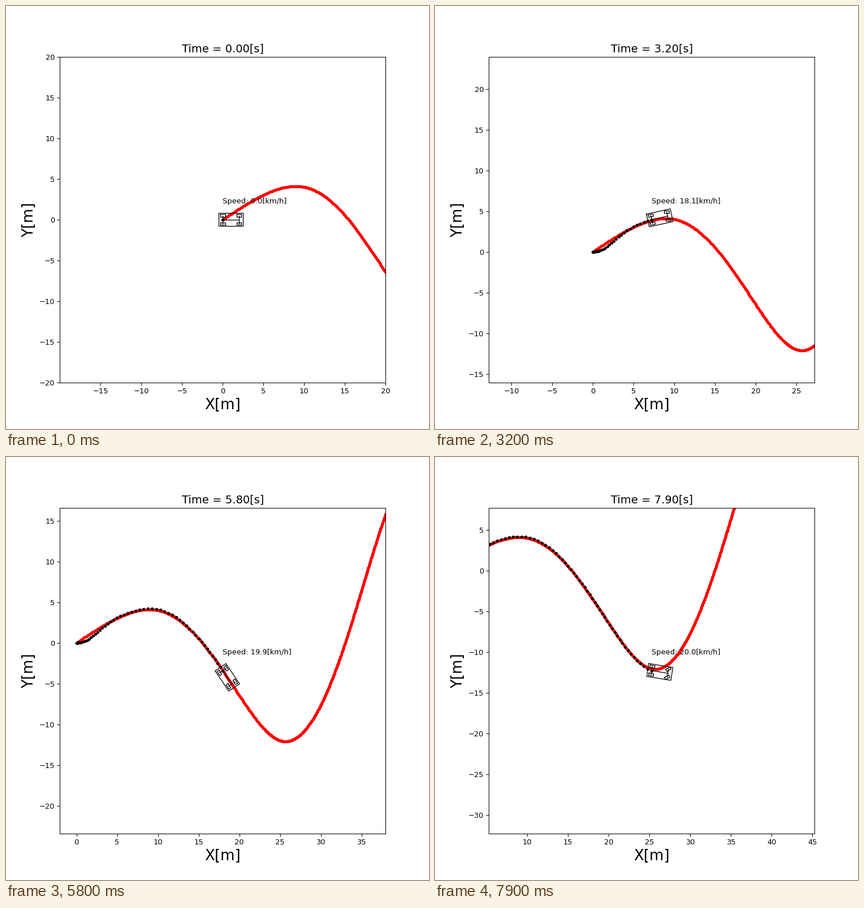
Write a matplotlib script that moves like this. It is 748 px wide and 748 px high and loops after 8000 ms.

```python
import numpy as np
import matplotlib.pyplot as plt
from matplotlib.animation import FuncAnimation

FRAMES, DT = 80, 0.1
BASE = 2.0                      # wheel base [m]
TARGET = 20.0                   # cruising speed [km/h]
MAX_STEER = np.radians(40)
K_YAW, K_SIDE = 1.0, 0.5


def natural_spline(t, p, s):
    """Value, first and second derivative of a natural cubic spline."""
    h, n = np.diff(t), len(t)
    a, b = np.eye(n), np.zeros(n)
    for i in range(1, n - 1):
        a[i, i - 1:i + 2] = h[i - 1], 2 * (h[i - 1] + h[i]), h[i]
        b[i] = 6 * ((p[i + 1] - p[i]) / h[i] - (p[i] - p[i - 1]) / h[i - 1])
    m = np.linalg.solve(a, b)
    i = np.clip(np.searchsorted(t, s, side="right") - 1, 0, n - 2)
    u, k = s - t[i], (m[i + 1] - m[i]) / h[i]
    slope = (p[i + 1] - p[i]) / h[i] - h[i] * (2 * m[i] + m[i + 1]) / 6
    return (p[i] + u * (slope + u * (m[i] / 2 + u * k / 6)),
            slope + u * (m[i] + u * k / 2),
            m[i] + u * k)


# Course through a few way points
way_x = np.array([0.0, 10, 25, 40, 50])
way_y = np.array([0.0, 4, -12, 20, -13])
knots = np.concatenate([[0], np.cumsum(np.hypot(np.diff(way_x), np.diff(way_y)))])
s = np.arange(0, knots[-1], 0.1)
cx, dx, ddx = natural_spline(knots, way_x, s)
cy, dy, ddy = natural_spline(knots, way_y, s)
c_yaw = np.arctan2(dy, dx)
c_curv = (dx * ddy - dy * ddx) / np.hypot(dx, dy) ** 3


def speed_at(k):
    """Soft start up to half speed, then an exponential approach [km/h]."""
    if k <= 16:
        return TARGET / 2 * (k / 16) ** 1.7
    return TARGET * (1 - 0.5 * 0.9 ** (k - 16))


def steering(x, y, yaw):
    """Rear wheel feedback on heading and lateral error."""
    i = np.argmin(np.hypot(cx - x, cy - y))
    side = (y - cy[i]) * np.cos(c_yaw[i]) - (x - cx[i]) * np.sin(c_yaw[i])
    err = (yaw - c_yaw[i] + np.pi) % (2 * np.pi) - np.pi
    curv = (c_curv[i] * np.cos(err) / (1 - c_curv[i] * side)
            - K_YAW * err - K_SIDE * side * np.sinc(err / np.pi))
    return np.clip(np.arctan(BASE * curv), -MAX_STEER, MAX_STEER)


def simulate():
    x, y, yaw = 1e-6, 0.0, 0.0
    states = [(x, y, yaw, 0.0, 0.0)]
    for k in range(1, FRAMES):
        steer = steering(x, y, yaw)
        step = (speed_at(k - 1) + speed_at(k)) / 2 / 3.6 * DT
        x += step * np.cos(yaw)
        y += step * np.sin(yaw)
        yaw += step * np.tan(steer) / BASE
        states.append((x, y, yaw, steer, speed_at(k)))
    return np.array(states)


def box(x0, x1, half):
    return np.array([[x0, x1, x1, x0, x0], [half, half, -half, -half, half]])


def place(pts, angle, x, y):
    c, q = np.cos(angle), np.sin(angle)
    return np.array([[c, -q], [q, c]]) @ pts + [[x], [y]]


BODY, TIRE = box(-0.5, 2.5, 0.8), box(-0.3, 0.3, 0.15)
AXLES = [np.array([[0, 0], [-0.5, 0.5]]),
         np.array([[BASE, BASE], [-0.5, 0.5]]),
         np.array([[0, BASE], [0, 0]])]


def car_parts(steer):
    tires = [place(TIRE, a, px, py)
             for px, a in ((0, 0), (BASE, steer)) for py in (0.5, -0.5)]
    return [BODY] + AXLES + tires


states = simulate()

fig = plt.figure(figsize=(8, 8), dpi=93.5)
ax = fig.add_subplot()
ax.set_aspect("equal")
ax.set_xlabel("X[m]", fontsize=20)
ax.set_ylabel("Y[m]", fontsize=20)
title = ax.set_title("", fontsize=15)
ax.plot(cx, cy, "r.")
lines = [ax.plot([], [], "k", lw=1)[0] for _ in car_parts(0)]
trail, = ax.plot([], [], "k.")
label = ax.text(0, 0, "", fontsize=10)


def update(k):
    x, y, yaw, steer, speed = states[k]
    ax.set_xlim(x - 20, x + 20)
    ax.set_ylim(y - 20, y + 20)
    title.set_text(f"Time = {k * DT:.2f}[s]")
    for line, part in zip(lines, car_parts(steer)):
        line.set_data(*place(part, yaw, x, y))
    trail.set_data(states[:k + 1, 0], states[:k + 1, 1])
    label.set_position((x, y + 2))
    label.set_text(f"Speed: {speed:.1f}[km/h]")
    return [title, label, trail, *lines]


anim = FuncAnimation(fig, update, frames=FRAMES, interval=100,
                     repeat=True, repeat_delay=0)
plt.show()
```
